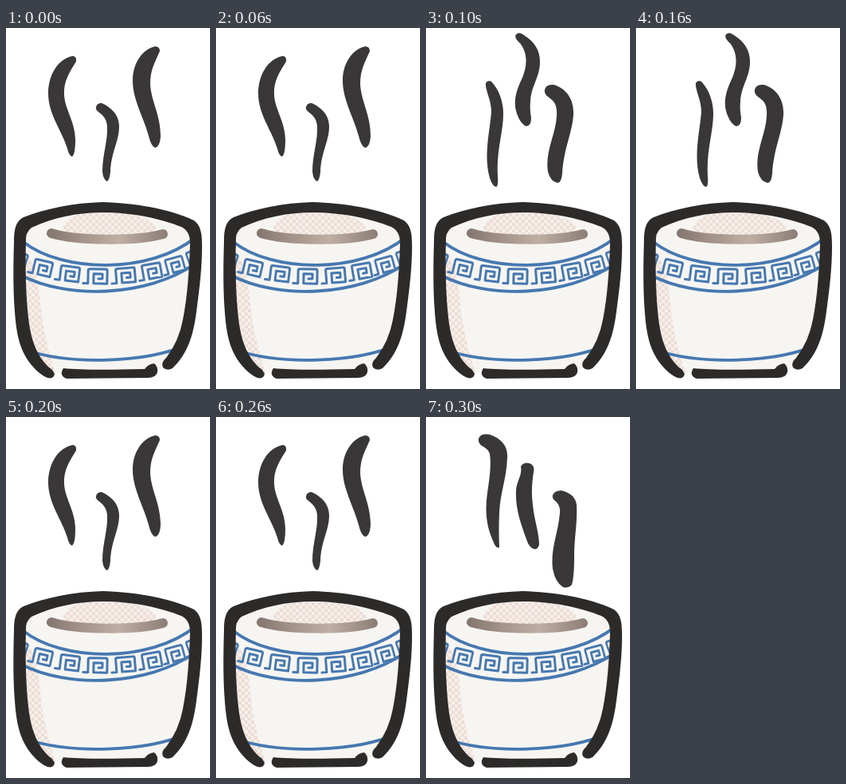
An HTML page that plays this animation: 256 px wide and 452 px high, repeating every 400 ms.

```html
<!DOCTYPE html>
<html lang="en">
<head>
<meta charset="utf-8">
<title>Steaming cup</title>
<style>
  html, body { margin: 0; width: 100%; height: 100%; overflow: hidden; background: #fff; }
  svg { display: block; width: 100%; height: 100%; }
</style>
</head>
<body>
<svg viewBox="0 0 256 452" fill="none" stroke-linecap="round" stroke-linejoin="round">
  <defs>
    <linearGradient id="tea" x1="50" x2="203" y1="0" y2="0" gradientUnits="userSpaceOnUse">
      <stop stop-color="#82756f"/>
      <stop offset=".3" stop-color="#a49389"/>
      <stop offset=".6" stop-color="#bfaea3"/>
      <stop offset="1" stop-color="#8b7d76"/>
    </linearGradient>
    <pattern id="dots" width="8" height="8" patternUnits="userSpaceOnUse">
      <path fill="#f6efeb" d="M0 0H8V8H0Z"/>
      <path fill="#ecddd5" d="M0 0H4V4H0ZM4 4H8V8H4Z"/>
    </pattern>
    <path id="body" d="M60 432C36 418 22 400 18 365Q15 310 18 250Q60 226 122 225Q190 226 238 250Q240 310 229 365Q219 410 192 428Z"/>
    <clipPath id="inside"><use href="#body"/></clipPath>
  </defs>

  <use href="#body" fill="#f6f5f2"/>
  <g clip-path="url(#inside)">
    <path fill="url(#dots)" d="M18 272Q38 290 42 335Q46 385 62 432H18ZM72 248Q82 229 123 229Q169 229 188 248L186 259Q125 266 72 257Z"/>
    <path stroke="url(#tea)" stroke-width="12" d="M57 257C90 267 165 267 197 258"/>
    <g stroke="#4678b0">
      <path stroke-width="3.800" d="M22 268C70 306 180 309 238 262"/>
      <path stroke-width="3.800" d="M20 310C75 339 175 338 238 295M24 403C80 422 175 420 229 396"/>
      <g id="keys" stroke-width="3"></g>
    </g>
  </g>
  <g fill="#2d2b2a">
    <path d="M52 438Q60 440 61 433L58 428C44 418 34 400 30 376C25 345 24 300 25 268Q24 256 32 250C60 237 90 231 121 231C160 231 195 239 220 249Q231 254 231 270C230 300 228 335 222 365Q217 392 201 413Q194 419 197 425Q202 430 209 426C228 408 235 385 239 355C243 325 246 300 246 274C246 258 245 248 236 241C205 226 160 219 121 218C85 219 50 226 22 237C12 242 10 252 10 268C9 300 9 330 11 355C13 385 18 405 32 422Q42 434 52 438Z"/>
    <path d="M72 426Q100 429 174 427Q178 421 186 420Q191 424 190 431Q188 438 178 438L76 439Q66 435 72 426Z"/>
  </g>
  <path id="steam" fill="#393737"/>
</svg>
<script>
  const STEP = 100;

  const swayed =
    "M84 35Q89 36 88 42C80 55 72 66 73 84C74 102 87 118 87 140Q87 158 83 161Q79 160 77 151C70 128 53 108 53 82C53 58 66 38 84 35Z" +
    "M113 99Q114 94 120 94C131 99 142 108 142 123C142 142 132 155 131 180Q130 190 127 192Q122 190 121 180C121 158 128 142 127 122Q126 112 116 105Q112 102 113 99Z" +
    "M187 23Q193 23 193 29C187 43 181 52 181 70C182 92 194 108 194 136Q193 149 187 150Q182 148 179 135C173 112 159 90 159 66C159 44 171 27 187 23Z";
  const raised =
    "M75 69Q77 65 82 67C92 78 97 92 97 108C97 130 88 155 90 185Q91 198 88 199Q84 199 80 188C72 160 80 130 82 105C82 90 74 78 75 69Z" +
    "M113 8Q117 4 123 9C136 17 143 28 143 42C143 62 132 72 131 92Q130 104 132 112Q132 123 126 123Q120 121 116 112C107 94 114 77 121 62C127 47 128 32 118 19Q110 12 113 8Z" +
    "M149 77Q151 70 160 71C176 75 186 90 185 108C184 130 173 150 171 182Q170 194 165 194Q156 192 153 180C149 155 163 133 164 110C165 95 160 91 153 86Q148 82 149 77Z";
  const settled =
    "M66 27Q69 20 80 22C95 27 103 37 102 51C101 78 93 95 92 120Q91 140 92 163Q88 166 84 155C75 135 74 115 77 95C80 75 82 60 80 46Q78 40 70 36Q65 32 66 27Z" +
    "M119 62Q122 56 130 58Q137 61 135 69C133 82 132 95 134 110C136 130 142 145 142 160Q140 167 135 165Q129 163 126 153C119 133 112 115 113 92C114 79 121 73 119 62Z" +
    "M159 98Q161 92 170 92Q187 96 189 110C190 135 186 150 186 175Q186 200 183 210Q178 215 172 213Q162 207 159 190C156 165 166 145 168 120Q169 110 161 104Q158 101 159 98Z";
  const poses = [swayed, raised, swayed, settled];

  // Greek key band, following the curve of the cup
  const key = "M-19 9H-13V-7Q-13-9-11-9H9Q11-9 11-7V9H-6V-3H5V3H0";
  document.getElementById("keys").innerHTML = [16, 47, 81, 116, 151, 184, 213, 239].map(x => {
    const d = (x - 123) / 100;
    const y = 311 - 18 * d * d;
    return `<path d="${key}" transform="translate(${x} ${y}) rotate(${-17 * d}) scale(${1 - 0.12 * d * d} 1)"/>`;
  }).join("");

  const steam = document.getElementById("steam");
  function draw(time) {
    steam.setAttribute("d", poses[Math.floor(time / STEP) % poses.length]);
  }
  function tick() {
    draw(performance.now());
    requestAnimationFrame(tick);
  }
  tick();
</script>
</body>
</html>
```
